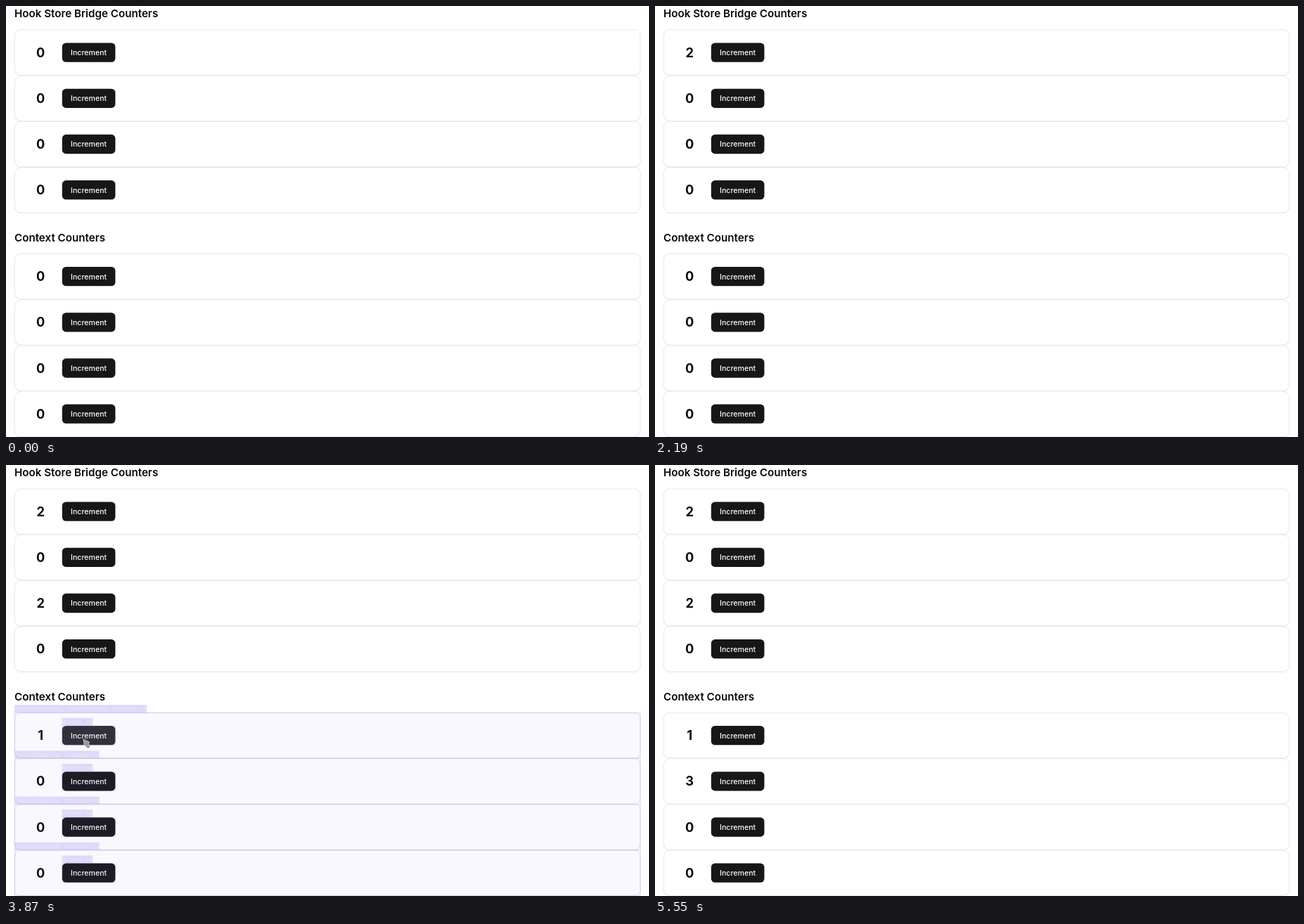
Recreate the animation shown at these times as an HTML page. Size 914x613 px, loop 6360 ms.

```html
<!DOCTYPE html>
<html lang="en">
<head>
<meta charset="utf-8">
<title>Counters</title>
<style>
  html, body { margin: 0; width: 100%; height: 100%; overflow: hidden; background: #fff; }
  svg { display: block; font-family: Inter, sans-serif; fill: #0a0a0a; }
  .title { font-size: 15.16px; font-weight: 600; }
  .count { font-size: 18.2px; font-weight: 700; text-anchor: middle; }
  .caption { font-size: 10.6px; font-weight: 500; text-anchor: middle; fill: #fafafa; }
  .shade { fill: none; stroke: #000; stroke-opacity: .06; }
  .card { fill: #fff; stroke: #e2e2e2; stroke-width: .8; }
  .outline { fill: rgb(115 97 230 / .1); stroke: rgb(115 97 230); stroke-width: .9; }
  .tag { fill: rgb(115 97 230); }
  .tagText { font: 8px "Liberation Mono", monospace; fill: #fff; fill-opacity: .45; white-space: pre; }
</style>
</head>
<body>
<svg id="stage" width="914" height="613" viewBox="0 0 914 613"></svg>
<script>
const LOOP = 6360, STEP = 60, PITCH = 65.2;
const stage = document.getElementById('stage');

function add(parent, name, attrs, text = '') {
  const el = document.createElementNS('http://www.w3.org/2000/svg', name);
  for (const key in attrs) el.setAttribute(key, attrs[key]);
  el.textContent = text;
  return parent.appendChild(el);
}

const sectionTop = row => row < 4 ? 33.9 : 352.4;
const rowTop = row => sectionTop(row) + row % 4 * PITCH;

add(stage, 'text', { class: 'title', x: 12, y: 16 }, 'Hook Store Bridge Counters');
add(stage, 'text', { class: 'title', x: 12, y: 334.5 }, 'Context Counters');

const rows = Array.from({ length: 8 }, (_, row) => {
  const y = rowTop(row), mid = y + 32.2;
  const box = { x: 12.4, width: 889.2, height: PITCH - .7, rx: 8.5 };
  add(stage, 'rect', { ...box, class: 'shade', y: y + .8 });
  add(stage, 'rect', { ...box, class: 'card', y });
  const count = add(stage, 'text', { class: 'count', x: 49.2, y: mid + 6.6 });
  const button = add(stage, 'rect', { x: 79.8, y: mid - 13.65, width: 75.6, height: 27.3, rx: 5.5 });
  add(stage, 'text', { class: 'caption', x: 117.6, y: mid + 3.9 }, 'Increment');
  return { count, button };
});

// Click times and hover spans for each row
const clicks = [[1470, 1590], [], [2850, 2970], [], [3570], [4290, 4530, 4710], [], []];
const hovers = [[0, 1470, 2130], [1, 1050, 1230], [1, 2490, 2670], [2, 2850, 3210],
                [4, 3450, 3990], [5, 4110, 5190]];

function outline(group, x, y, width, height, label) {
  add(group, 'rect', { class: 'outline', x, y, width, height });
  if (!label) return;
  add(group, 'rect', { class: 'tag', x: x - .4, y: y - 11.2, width: label.length * 4.8 + .6, height: 11.2 });
  add(group, 'text', { class: 'tagText', x, y: y - 3 }, label);
}

function flash(start, duration, peak, times, providerRow, updated) {
  const group = add(stage, 'g', {});
  outline(group, 12.4, sectionTop(providerRow), 889.2, 4 * PITCH - .7,
          providerRow < 4 && !(0 in updated) ? 'StoreProvider ' + times : '');
  for (const row in updated) {
    const y = rowTop(+row);
    outline(group, 12.4, y, 889.2, PITCH - .7, updated[row] + ' ' + times);
    outline(group, 79.8, y + 18.6, 75.6, 27.3, 'Button ' + times);
  }
  return { group, start, duration, peak };
}

const context = {
  4: 'CountsProvider, CountContex, Counter',
  5: 'Count1Countex, Counter',
  6: 'Count2Countex, Counter',
  7: 'Count3Countex, Counter'
};
const flashes = [
  flash(1470, 720, .9, '×2', 0, { 0: 'StoreProvider, Count, Counter' }),
  flash(2850, 600, .95, '×2', 0, { 2: 'Count2, Counter' }),
  flash(3570, 540, .52, '×1', 4, context),
  flash(4290, 540, .52, '×1', 4, context),
  flash(4950, 600, .9, '×2', 4, context)
];

const pointer = add(stage, 'path', {
  d: 'M0 0L8.5 4 7.5 6.5 9.5 11.5 6.5 13 1.2 8.5Z',
  fill: '#999', stroke: '#d4d4d4', 'stroke-width': .8
});

// Each path is a list of [time, x, y]; the pointer is hidden outside of them
const paths = [
  [[1170, 110, 64], [2190, 110, 64]],
  [[2850, 110, 196], [3150, 110, 198], [3270, 105.5, 389], [3330, 107, 411], [3450, 110, 390],
   [3870, 110, 390], [4110, 115.5, 457.5], [5070, 115.5, 457.5], [5310, 128, 625]]
];

function pointerAt(t) {
  for (const path of paths) {
    const i = path.findIndex(point => t < point[0]);
    if (i < 1) continue;
    const [t0, x0, y0] = path[i - 1], [t1, x1, y1] = path[i];
    const k = (t - t0) / (t1 - t0);
    return [x0 + (x1 - x0) * k, y0 + (y1 - y0) * k];
  }
}

function draw(now) {
  const time = now % LOOP;
  const t = Math.floor((time - 30) / STEP) * STEP + 30;

  rows.forEach(({ count, button }, row) => {
    const value = String(clicks[row].filter(c => c <= t).length);
    if (count.textContent !== value) count.textContent = value;
    const hovered = hovers.some(([r, from, to]) => r === row && t >= from && t < to);
    button.setAttribute('fill', hovered ? '#2e2e2f' : '#171717');
  });

  for (const { group, start, duration, peak } of flashes) {
    const p = (t - start) / duration;
    group.setAttribute('opacity', p >= 0 && p < 1 ? peak * (1 - p) : 0);
  }

  const spot = pointerAt(t);
  pointer.setAttribute('visibility', spot ? 'visible' : 'hidden');
  if (spot) pointer.setAttribute('transform', `translate(${spot})`);
}

const begin = performance.now();
function tick() {
  draw(performance.now() - begin);
  requestAnimationFrame(tick);
}
tick();
</script>
</body>
</html>
```
